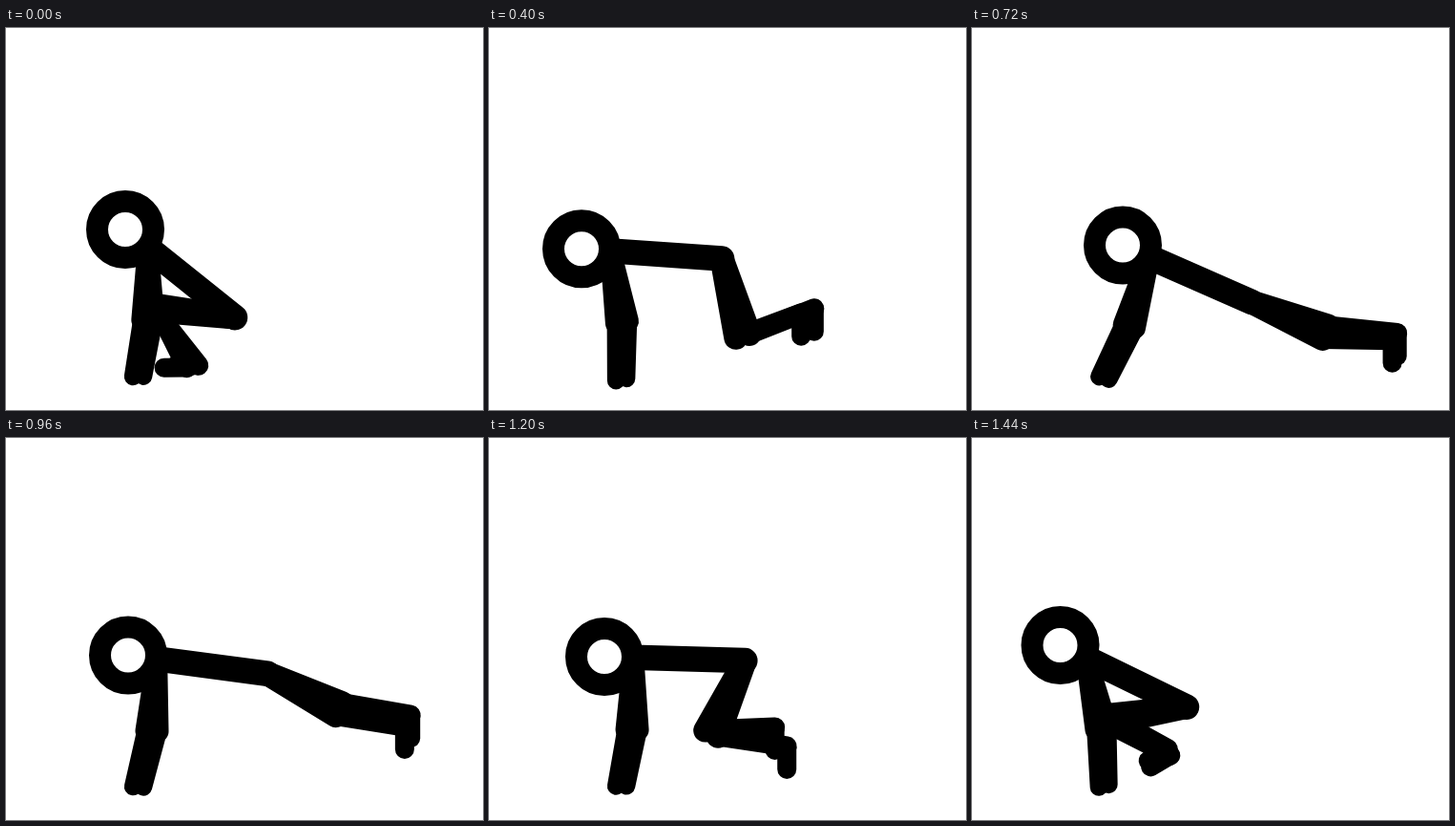
An HTML page with a canvas that plays this animation: 500 px wide and 400 px high, repeating every 1.52 s.

```html
<!DOCTYPE html>
<html>
<head>
<meta charset="utf-8">
<style>
  html, body { margin: 0; overflow: hidden; background: #fff; }
  canvas { display: block; }
</style>
</head>
<body>
<canvas id="stage" width="500" height="400"></canvas>
<script>
const ctx = document.getElementById('stage').getContext('2d');
const STEP_MS = 80, STEPS = 19;
const HAND_X = 133, FLOOR_Y = 366;

// Key poses: step, head x, head y, then angles in degrees:
// torso, front thigh, front shin, extra turn of the rear shin
const poses = [
  [0, 125, 211, 38.7, 184.8, 51.5, 12],
  [3, 85, 230.5, 4.1, 111.7, -26.9, 2],
  [7, 109, 232, 3.9, 28.1, -16, 0],
  [9, 158, 227.5, 23.8, 17.2, 6, -5],
  [12, 128, 227.5, 7.5, 21.5, 10, -1],
  [14, 98, 230, 4, 73, -2, -3],
  [15, 121, 229, 1.6, 109.7, 8.5, -11],
  [18, 92.5, 217, 26, 168, 27, 2]
];

function poseAt(step) {
  const next = poses.findIndex(p => p[0] >= step);
  const b = poses[next], a = poses[Math.max(0, next - 1)];
  const k = (step - a[0]) / (b[0] - a[0] || 1);
  return a.map((v, i) => v + (b[i] - v) * k);
}

function project([x, y], angle, length) {
  const r = angle * Math.PI / 180;
  return [x + Math.cos(r) * length, y + Math.sin(r) * length];
}

function bone(from, angle, length, width) {
  const to = project(from, angle, length);
  ctx.lineWidth = width;
  ctx.beginPath();
  ctx.moveTo(...from);
  ctx.lineTo(...to);
  ctx.stroke();
  return to;
}

// The arm points at its planted hand with a constant elbow bend.
function arm(shoulder, handX, bend) {
  const aim = Math.atan2(FLOOR_Y - shoulder[1], handX - shoulder[0]) * 180 / Math.PI;
  const elbow = bone(shoulder, aim - bend * 0.44, 76, 22);
  bone(elbow, aim + bend * 0.56, 60, 18.5);
}

function leg(hip, thigh, shin, foot) {
  const knee = bone(hip, thigh, 84, 25);
  bone(bone(knee, shin, 73, 21), foot, 24, 20);
}

function draw(step) {
  const [, x, y, torso, thigh, shin, rearTurn] = poseAt(step);
  ctx.fillStyle = '#fff';
  ctx.fillRect(0, 0, 500, 400);
  ctx.strokeStyle = '#000';
  ctx.lineCap = 'round';

  const shoulder = project([x, y], torso, 30.4);
  const hip = bone(shoulder, torso, 117, 26.5);
  arm(shoulder, HAND_X, 4);
  arm(shoulder, HAND_X + 11, 16);

  // Tucking the legs closes the gap between them and rolls the feet back.
  const tuck = Math.max(0, (thigh - 135) / 50);
  const foot = 90 + 90 * tuck;
  leg(hip, thigh, shin, foot);
  leg(hip, thigh + 10 - 6 * tuck, shin + rearTurn, foot);

  ctx.lineWidth = 23;
  ctx.beginPath();
  ctx.arc(x, y, 29.5, 0, Math.PI * 2);
  ctx.fill();
  ctx.stroke();
}

const start = performance.now();
function tick() {
  draw(Math.floor((performance.now() - start) / STEP_MS) % STEPS);
  requestAnimationFrame(tick);
}
tick();
</script>
</body>
</html>
```
